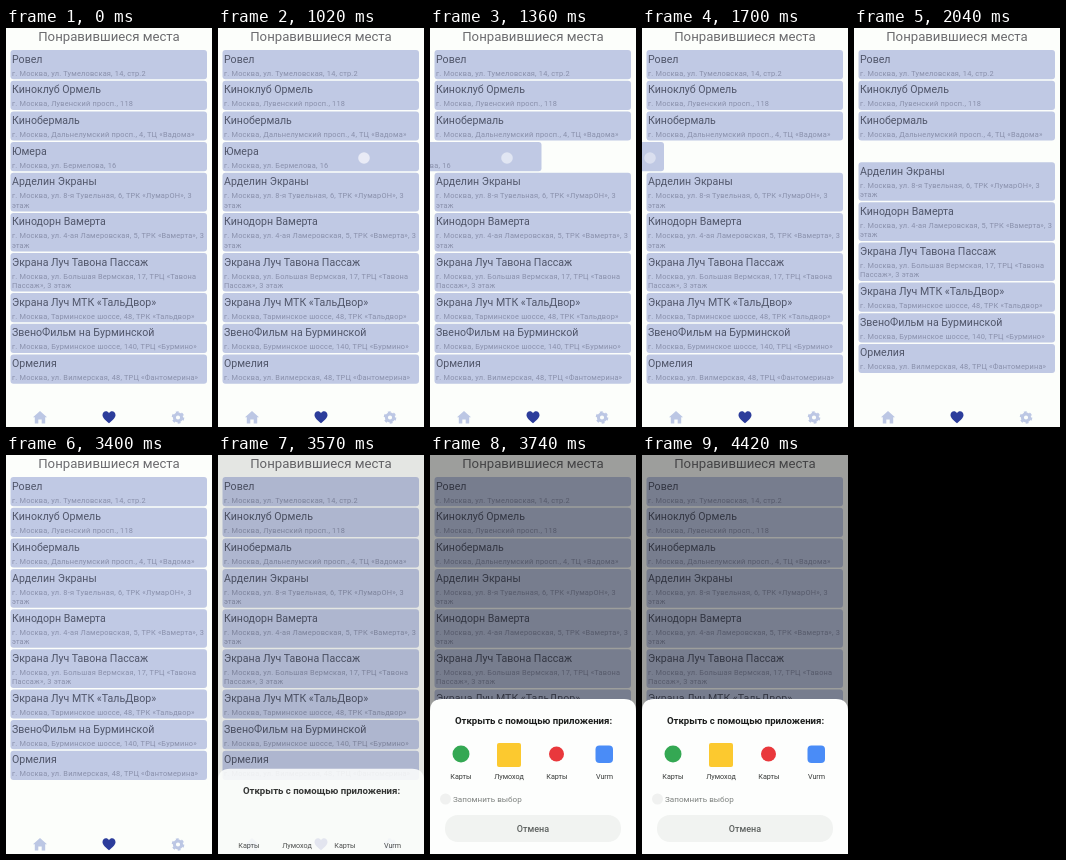
An HTML page for the animation above (4590 ms loop, 206 by 399 pixels).

```html
<!DOCTYPE html>
<html lang="ru">
<head>
<meta charset="utf-8">
<title>Понравившиеся места</title>
<style>
html, body { margin: 0; width: 100%; height: 100%; overflow: hidden; background: #fcfefb; }
svg { display: block; width: 100%; height: 100%; font-family: Roboto, sans-serif; }
.head { font-size: 13.2px; fill: #6c6c6f; }
.name { font-size: 10.6px; fill: #50566a; }
.addr { font-size: 7.4px; letter-spacing: .2px; fill: #8990ab; }
.ask { font-size: 9.6px; font-weight: 700; fill: #1c1e1d; }
.app { font-size: 7.2px; fill: #383a39; }
.keep { font-size: 8.1px; fill: #7d807e; }
.cancel { font-size: 9px; font-weight: 500; fill: #5c605e; }
.mid { text-anchor: middle; }
</style>
</head>
<body>
<svg id="stage" viewBox="0 0 206 399">
  <rect width="206" height="399" fill="#fcfefb"/>
  <text class="head mid" x="103" y="12.6">Понравившиеся места</text>
  <g id="list"></g>
  <g id="nav">
    <path d="M34 383l7 6.3h-1.8v6.2h-3.5v-4h-3.4v4h-3.5v-6.2H27z" fill="#bcc7e4"/>
    <path d="M103 395.3C98.6 391.6 96.5 389.6 96.5 387C96.5 382.8 101.3 382 103 385.2C104.7 382 109.5 382.8 109.5 387C109.5 389.6 107.4 391.6 103 395.3z" fill="#2c3d9b"/>
    <circle cx="172" cy="389.5" r="3.6" fill="none" stroke="#bcc7e4" stroke-width="3"/>
    <circle cx="172" cy="389.5" r="5.4" fill="none" stroke="#bcc7e4" stroke-width="1.8" stroke-dasharray="2.83 2.83"/>
  </g>
  <circle id="touch" cy="130" r="5.8" fill="#f2f4fa" fill-opacity=".8"/>
  <rect id="dim" width="206" height="399" fill="#000"/>
  <g id="sheet">
    <path d="M0 399V256Q0 244 12 244H194Q206 244 206 256V399z" fill="#fdfefd"/>
    <text class="ask mid" x="103.5" y="269.4">Открыть с помощью приложения:</text>
    <g id="icons">
      <circle cx="31" cy="299" r="8.5" fill="#34a853"/>
      <rect x="67" y="288" width="24" height="24" rx="2" fill="#fcc92f"/>
      <circle cx="126.5" cy="299" r="7.5" fill="#e9383c"/>
      <rect x="165.5" y="290.5" width="17.5" height="17.5" rx="4" fill="#4a8cf7"/>
    </g>
    <g id="apps"></g>
    <circle cx="15.5" cy="344" r="5.5" fill="#f0f1f0"/>
    <text class="keep" x="23" y="346.7">Запомнить выбор</text>
    <rect x="15" y="360" width="176" height="27" rx="13" fill="#f1f3f1"/>
    <text class="cancel mid" x="103" y="376.8">Отмена</text>
  </g>
</svg>
<script>
(() => {
  const LOOP = 4590, STEP = 170;
  const PLACES = [
    ['Ровел', 'ул. Тумеловская, 14, стр.2'],
    ['Киноклуб Ормель', 'Лувенский просп., 118'],
    ['Кинобермаль', 'Дальнелумский просп., 4, ТЦ «Вадома»'],
    ['Юмера', 'ул. Бермелова, 16'],
    ['Арделин Экраны', 'ул. 8-я Тувельная, 6, ТРК «ЛумарОН», 3', 'этаж'],
    ['Кинодорн Вамерта', 'ул. 4-ая Ламеровская, 5, ТРК «Вамерта», 3', 'этаж'],
    ['Экрана Луч Тавона Пассаж', 'ул. Большая Вермская, 17, ТРЦ «Тавона', 'Пассаж», 3 этаж'],
    ['Экрана Луч МТК «ТальДвор»', 'Тарминское шоссе, 48, ТРК «Тальдвор»'],
    ['ЗвеноФильм на Бурминской', 'Бурминское шоссе, 140, ТРЦ «Бурмино»'],
    ['Ормелия', 'ул. Вилмерская, 48, ТРЦ «Фантомерина»']
  ];
  const APPS = [['Карты', 31], ['Лумоход', 79], ['Карты', 127], ['Vurm', 174.5]];
  const REMOVED = 3, ROW = 30.7, TALL = 40.1;

  const $ = id => document.getElementById(id);
  const clamp = v => Math.max(0, Math.min(1, v));
  const span = (t, a, b) => clamp((t - a) / (b - a));
  const smooth = p => p * p * (3 - 2 * p);
  const move = (el, x, y) => el.setAttribute('transform', `translate(${x.toFixed(2)} ${y.toFixed(2)})`);
  const fade = (el, v) => el.setAttribute('opacity', v.toFixed(3));

  function add(parent, tag, attrs, text) {
    const el = document.createElementNS(parent.namespaceURI, tag);
    for (const k in attrs) el.setAttribute(k, attrs[k]);
    if (text) el.textContent = text;
    parent.appendChild(el);
    return el;
  }

  let nextY = 22;
  const cards = PLACES.map(([title, addr, more]) => {
    const h = more ? TALL : ROW, g = add($('list'), 'g', {}), y = nextY;
    add(g, 'rect', { x: 4.5, width: 196.5, height: h - 1.5, rx: 3, fill: '#c0c9e4' });
    add(g, 'text', { class: 'name', x: 6, y: 12.6 }, title);
    add(g, 'text', { class: 'addr', x: 6, y: 25.6 }, 'г. Москва, ' + addr);
    if (more) add(g, 'text', { class: 'addr', x: 6, y: 34.8 }, more);
    nextY += h;
    return { g, y };
  });
  for (const [label, x] of APPS) add($('apps'), 'text', { class: 'app mid', x, y: 323.6 }, label);

  function render(t) {
    // swipe one card away, then close the gap
    const swipe = smooth(span(t, 1020, 1700));
    const slide = 179 * swipe + 30 * span(t, 1700, 1800);
    const gap = ROW * smooth(span(t, 1870, 2300));
    cards.forEach(({ g, y }, i) =>
      move(g, i === REMOVED ? -slide : 0, i > REMOVED ? y - gap : y));
    $('touch').setAttribute('cx', 146 - 138 * swipe);
    fade($('touch'), t >= 1020 && t < 1870 ? 1 - .35 * swipe : 0);

    // bottom sheet
    const p = span(t, 3400, 3740);
    fade($('dim'), .38 * p * p);
    move($('sheet'), 0, 155 * Math.pow(1 - p, 1.15));
    fade($('sheet'), p ? .76 + .24 * p : 0);
    fade($('icons'), span(p, .6, 1));
  }

  const start = performance.now();
  function tick() {
    const t = (performance.now() - start) % LOOP;
    render(Math.floor(t / STEP) * STEP);
    requestAnimationFrame(tick);
  }
  tick();
})();
</script>
</body>
</html>
```
